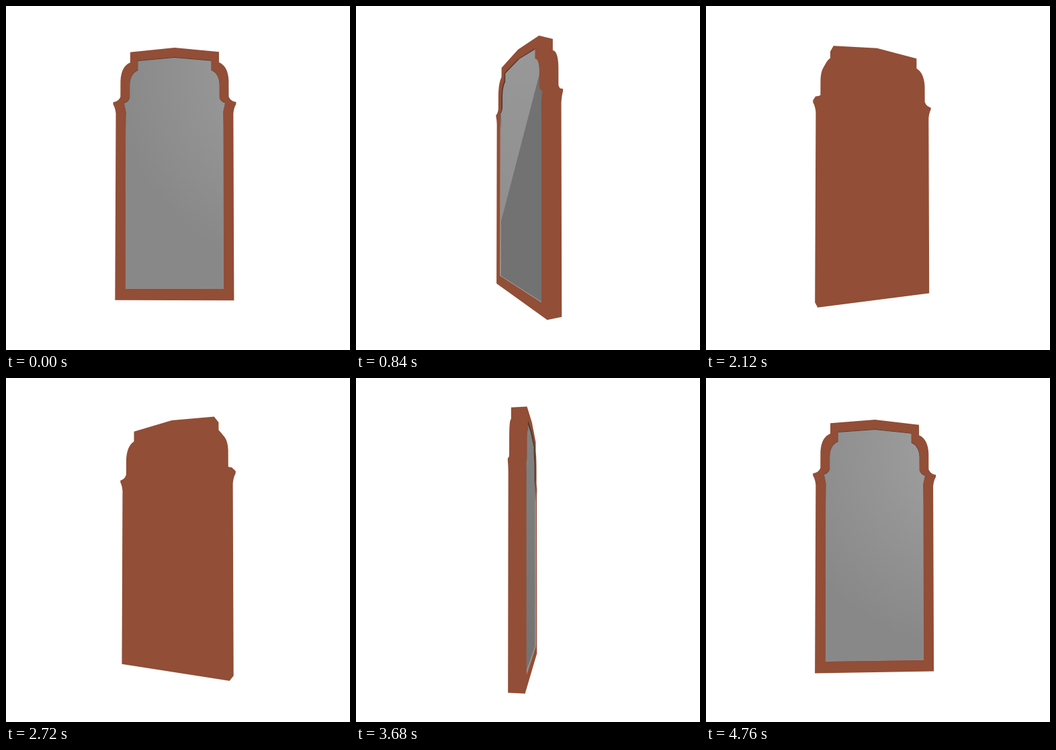
Animation, 512 px wide and 512 px high, one loop 4.8 s. Source, as an HTML page with a canvas:

```html
<!DOCTYPE html>
<html lang="en">
<head>
<meta charset="utf-8">
<title>Turning mirror</title>
<style>
html, body { margin: 0; width: 100%; height: 100%; overflow: hidden; background: #fff; }
canvas { display: block; width: 512px; height: 512px; }
</style>
</head>
<body>
<canvas id="stage" width="512" height="512"></canvas>
<script>
const ctx = document.getElementById('stage').getContext('2d');
const LOOP = 4800, STEP = 40;
const MID = 256, FOCAL = 490, SHIFT = -5, PITCH = 0.0286;
const SIN = Math.sin(PITCH), COS = Math.cos(PITCH);
const FRONT = 11, BACK = -10, RECESS = 2.3;
const WOOD = '#924e36';

// Right half, top to bottom: [x, y] is a corner, [cx, cy, x, y] a curve.
const OUTER = [
  [0, 205.6], [65.3, 199.2], [65.3, 183.7], [78.5, 178, 79.4, 156.8], [79.4, 133],
  [82, 126, 90.1, 125], [90, 121.5], [87, 117, 86, 108], [85.7, -162.5]
];
const INNER = [
  [0, 191.7], [54.2, 186.7], [54.2, 172.7], [65.5, 168, 66.1, 151.8], [66.1, 132],
  [68, 126, 74.4, 124], [73, 118, 71.5, 111], [70.9, -146.2]
];
// Edges of the bright backdrop and the direction of the soft lamp.
const EDGES = [[0.62, 0.25, -0.743], [-0.49, 0.287, -0.82]];
const LAMP = [0.35, 0.35, 0.87];

function outline(half) {
  const right = [];
  let x = 0, y = 0;
  for (const p of half) {
    if (p.length === 2) {
      right.push(p);
    } else {
      for (let i = 1; i <= 8; i++) {
        const t = i / 8, u = 1 - t;
        right.push([
          u * u * x + 2 * u * t * p[0] + t * t * p[2],
          u * u * y + 2 * u * t * p[1] + t * t * p[3]
        ]);
      }
    }
    [x, y] = right[right.length - 1];
  }
  const left = right.slice(1).reverse().map(([a, b]) => [-a, b]);
  return right.concat(left);
}

const frame = outline(OUTER), hole = outline(INNER);

function project(shape, depth, angle) {
  const s = Math.sin(angle), c = Math.cos(angle);
  return shape.map(([x, y]) => {
    const dist = FOCAL - (x * s + depth * c);
    const k = FOCAL / (y * SIN + dist * COS);
    return [
      MID + (x * c - depth * s + SHIFT) * k,
      MID - (y * COS - dist * SIN) * k
    ];
  });
}

function area(pts) {
  return pts.reduce((sum, [x, y], i) => {
    const [u, v] = pts[(i + 1) % pts.length];
    return sum + x * v - y * u;
  }, 0);
}

function trace(pts) {
  pts.forEach(([x, y], i) => i ? ctx.lineTo(x, y) : ctx.moveTo(x, y));
  ctx.closePath();
}

function fill(pts, style) {
  ctx.beginPath();
  trace(pts);
  ctx.fillStyle = style;
  ctx.fill();
}

function reflect(v, angle) {
  const nx = -Math.sin(angle), nz = Math.cos(angle);
  const k = 2 * (v[0] * nx + v[2] * nz);
  return [v[0] - k * nx, v[1], v[2] - k * nz];
}

// Keeps the part of a polygon whose mirrored view rays lie in front of a plane.
function cut(pts, [mx, my, mz]) {
  const side = ([x, y]) => mx * (x - MID)
    - (my * COS + mz * SIN) * (y - MID)
    + (my * SIN - mz * COS) * FOCAL;
  const out = [];
  pts.forEach((p, i) => {
    const q = pts[(i + 1) % pts.length], a = side(p), b = side(q);
    if (a >= 0) out.push(p);
    if (a * b < 0) {
      const t = a / (a - b);
      out.push([p[0] + (q[0] - p[0]) * t, p[1] + (q[1] - p[1]) * t]);
    }
  });
  return out;
}

function drawGlass(angle) {
  const rim = project(hole, FRONT, angle);
  const glass = project(hole, FRONT - RECESS, angle);
  ctx.save();
  ctx.beginPath();
  trace(rim);
  ctx.clip();

  const wall = ctx.createLinearGradient(0, 150, 0, 185);
  wall.addColorStop(0, '#56382d');
  wall.addColorStop(1, '#9b908a');
  fill(rim, wall);

  const grey = Math.round(85 + 51 * Math.cos(angle) + 6.5 * Math.sin(angle));
  fill(glass, `rgb(${grey},${grey},${grey})`);

  const lamp = reflect(LAMP, angle);
  if (lamp[2] < -0.15) {
    const x = MID - FOCAL * lamp[0] / lamp[2];
    const y = MID + FOCAL * (SIN + lamp[1] / lamp[2]) + 28;
    const glow = ctx.createRadialGradient(x, y, 0, x, y, 300);
    glow.addColorStop(0, 'rgba(255,255,255,.24)');
    glow.addColorStop(0.5, 'rgba(255,255,255,.11)');
    glow.addColorStop(1, 'rgba(255,255,255,0)');
    fill(glass, glow);
  }

  const lit = EDGES.reduce((pts, m) => cut(pts, reflect(m, angle)), glass);
  if (lit.length > 2) {
    const sheen = ctx.createLinearGradient(0, 70, 0, 420);
    sheen.addColorStop(0, 'rgba(255,255,255,.27)');
    sheen.addColorStop(1, 'rgba(255,255,255,.18)');
    fill(lit, sheen);
  }
  ctx.restore();
}

function draw(time) {
  const step = Math.floor(time % LOOP / STEP);
  const angle = (step * STEP / LOOP * 360 + 0.35) * Math.PI / 180;
  const front = project(frame, FRONT, angle);
  const back = project(frame, BACK, angle);

  ctx.fillStyle = '#fff';
  ctx.fillRect(0, 0, 512, 512);

  // All faces share one winding, so they merge without seams.
  const faces = [front, back];
  front.forEach((p, i) => {
    const j = (i + 1) % front.length;
    faces.push([p, front[j], back[j], back[i]]);
  });
  ctx.beginPath();
  faces.forEach(f => trace(area(f) < 0 ? f.slice().reverse() : f));
  ctx.fillStyle = WOOD;
  ctx.fill();

  if (area(front) > 0) drawGlass(angle);
}

const start = performance.now();
function tick() {
  draw(performance.now() - start);
  requestAnimationFrame(tick);
}
tick();
</script>
</body>
</html>
```
